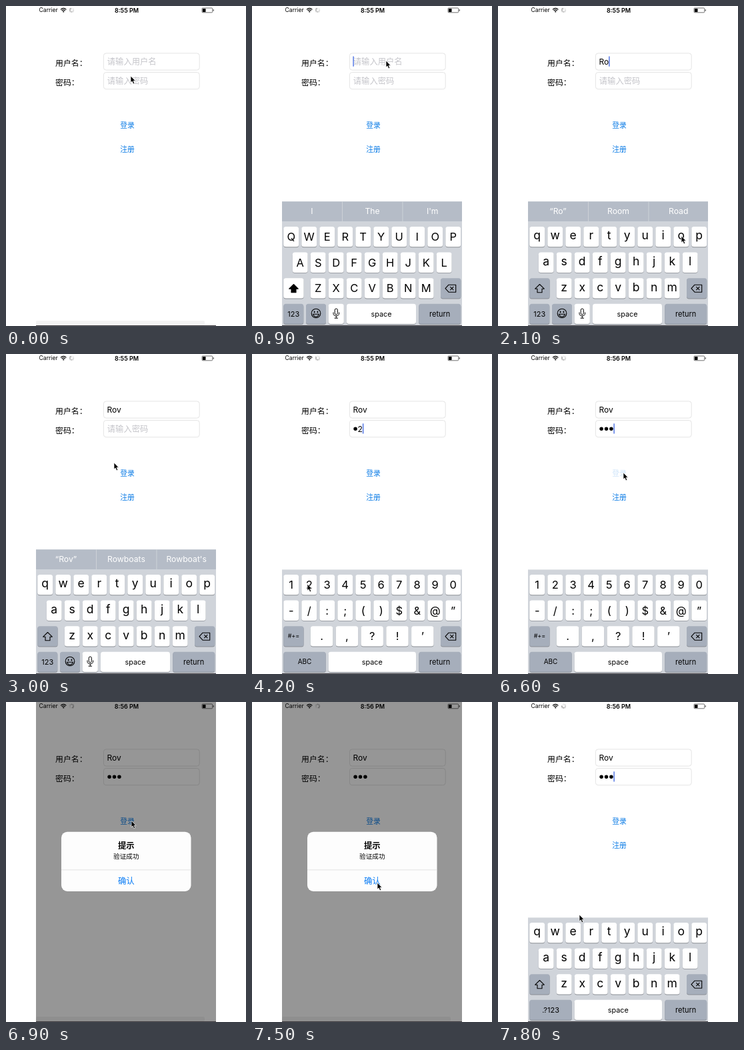
Animation, 360 px wide and 480 px high, one loop 8 s. Source, as an HTML page:

```html
<!DOCTYPE html>
<html lang="zh-CN">
<head>
<meta charset="utf-8">
<title>Login</title>
<style>
  html, body { margin: 0; width: 100%; height: 100%; overflow: hidden; background: #fff; }
  svg { display: block; width: 100vw; height: 100vh; }
  text { font-family: Inter, "Noto Sans CJK SC", "Noto Sans CJK", sans-serif; }
  .zh { font-family: "Noto Sans CJK SC", "Noto Sans CJK", sans-serif; }
</style>
</head>
<body>
<svg id="stage" viewBox="0 0 360 480" xmlns="http://www.w3.org/2000/svg"></svg>
<script>
const NS = 'http://www.w3.org/2000/svg';
const stage = document.getElementById('stage');
const BLUE = '#0a7be6', HINT = '#c5c5ca', DARK_KEY = '#a6aebb';

function add(parent, tag, attrs, content) {
  const el = document.createElementNS(NS, tag);
  for (const name in attrs) el.setAttribute(name, attrs[name]);
  if (content !== undefined) el.textContent = content;
  parent.appendChild(el);
  return el;
}
const group = parent => add(parent, 'g', {});
const rect = (parent, x, y, width, height, fill, rx = 0, more = {}) =>
  add(parent, 'rect', { x, y, width, height, fill, rx, ...more });
const path = (parent, d, more = {}) =>
  add(parent, 'path', { d, fill: 'none', stroke: '#000', 'stroke-width': 1.1, ...more });
const label = (parent, content, x, y, size, more = {}) =>
  add(parent, 'text', { x, y, 'font-size': size, 'text-anchor': 'middle', ...more }, content);
const chinese = (parent, content, x, y, size, more = {}) =>
  label(parent, content, x, y, size, { class: 'zh', 'text-anchor': 'start', ...more });
const show = (el, on) => el.setAttribute('visibility', on ? 'visible' : 'hidden');

// Status bar
rect(stage, 0, 0, 360, 480, '#fff');
rect(stage, 45, 472, 253, 7, '#f3f3f3', 2);
const statusBar = group(stage);
label(statusBar, 'Carrier', 49.5, 9.3, 8.64, { 'text-anchor': 'start' });
path(statusBar, 'M82 5.4Q86.2 1.4 90.4 5.4M83.6 7Q86.2 4.6 88.8 7', { 'stroke-width': 1.2 });
path(statusBar, 'M84.8 8.2Q86.2 7 87.6 8.2L86.2 9.8Z', { fill: '#000', stroke: 'none' });
const spinner = group(statusBar);
for (let i = 0; i < 12; i++) {
  path(spinner, 'M0 -1.9V-3.7', {
    transform: `rotate(${i * 30})`, stroke: '#555', 'stroke-width': .8, opacity: .1 + i / 13
  });
}
const clock = label(statusBar, '', 181, 9.5, 9, { 'font-weight': 600 });
rect(statusBar, 294, 3, 15.7, 6.8, 'none', 1.2, { stroke: '#333', 'stroke-width': .7 });
rect(statusBar, 294.9, 3.9, 4.6, 5, '#000', .4);
path(statusBar, 'M311.2 5.2V7.6', { stroke: '#333' });

// Form
chinese(stage, '用户名：', 74, 90, 11.9);
chinese(stage, '密码：', 74, 118.9, 11.9);
for (const y of [70.9, 99.5]) {
  rect(stage, 146.4, y, 143.8, 25.2, '#fff', 3.8, { stroke: '#dedede', 'stroke-width': .8 });
}
const userHint = chinese(stage, '请输入用户名', 151.8, 88, 12.3, { fill: HINT });
const passHint = chinese(stage, '请输入密码', 151.8, 116.9, 12.3, { fill: HINT });
const userText = label(stage, '', 151.4, 87.8, 12, { 'text-anchor': 'start' });
const dots = [0, 1, 2].map(i => add(stage, 'circle', { cx: 155.1 + 7.4 * i, cy: 112.3, r: 2.75 }));
const digit = label(stage, '', 0, 116.6, 12, { 'text-anchor': 'start' });
const caret = rect(stage, 0, 0, 1.4, 15.2, '#4a6fe3');
const login = chinese(stage, '登录', 182, 183.1, 10.8, { fill: BLUE, 'text-anchor': 'middle' });
chinese(stage, '注册', 182, 219.1, 10.8, { fill: BLUE, 'text-anchor': 'middle' });

// Keyboards
function key(parent, x, row, width, text, size, dark, lift = 0) {
  const y = 331 + 38.6 * row;
  rect(parent, x, y + .9, width, 30.3, '#8b8f95', 3.5);
  rect(parent, x, y, width, 30.3, dark ? DARK_KEY : '#fff', 3.5);
  if (text) label(parent, text, x + width / 2, y + 15 + size * .36 - lift, size);
}

function keyRow(parent, chars, row, firstCenter, pitch, width, size, lift) {
  [...chars].forEach((c, i) =>
    key(parent, firstCenter + pitch * i - width / 2, row, width, c, size, false, lift));
}

function backspace(parent) {
  key(parent, 283, 2, 30.3, '', 0, true);
  path(parent, 'M290 423.7L295 418.2H305.7V429.2H295Z', { 'stroke-linejoin': 'round' });
  path(parent, 'M297.3 421.2L302.3 426.2M302.3 421.2L297.3 426.2');
}

function shiftKey(parent, active) {
  key(parent, 47.3, 2, 30.3, '', 0, !active);
  path(parent, 'M62.5 417.5L69.3 424.2H66V429.7H59V424.2H55.7Z',
    { fill: active ? '#000' : 'none', 'stroke-linejoin': 'round' });
}

function emojiAndMic(parent) {
  key(parent, 81, 3, 30, '', 0, true);
  add(parent, 'circle', { cx: 96, cy: 461, r: 6.8, fill: 'none', stroke: '#000', 'stroke-width': 1.1 });
  for (const x of [93.6, 98.4]) add(parent, 'ellipse', { cx: x, cy: 459, rx: .9, ry: 1.4 });
  path(parent, 'M91.6 462.2H100.4Q99.4 466.2 96 466.2T91.6 462.2Z');
  key(parent, 114.6, 3, 23.2, '', 0, false);
  rect(parent, 124.2, 454, 4.2, 8.8, 'none', 2.1, { stroke: '#000' });
  path(parent, 'M122 459.5V461Q122 464.8 126.3 464.8T130.6 461V459.5M126.3 465V468M123.6 468.2H129',
    { 'stroke-width': 1 });
}

function keyboard({ rows, caps, digits, bar }) {
  const g = group(stage);
  rect(g, 45, 323.4, 270, 155.6, '#d0d4da');
  if (digits) {
    keyRow(g, rows[0], 0, 58.7, 27, 22.8, 16.5, 0);
    keyRow(g, rows[1], 1, 58.7, 27, 22.8, 16.5, 0);
    keyRow(g, rows[2], 2, 104.6, 37.8, 33.4, 16.5, 0);
    key(g, 47.3, 2, 30.3, '#+=', 9, true);
  } else {
    const size = caps ? 16.5 : 17.5, lift = caps ? 0 : 2;
    keyRow(g, rows[0], 0, 58.7, 27, 22.8, size, lift);
    keyRow(g, rows[1], 1, 72.2, 27, 22.8, size, lift);
    keyRow(g, rows[2], 2, 99.2, 27, 22.8, size, lift);
    shiftKey(g, caps);
  }
  backspace(g);
  if (bar) {
    key(g, 47.3, 3, 30, '123', 11, true);
    emojiAndMic(g);
    key(g, 142, 3, 104, 'space', 10.8);
  } else {
    key(g, 47.3, 3, 63.5, digits ? 'ABC' : '.?123', digits ? 10 : 11, true);
    key(g, 114.6, 3, 131.4, 'space', 10.8);
  }
  key(g, 250.2, 3, 63, 'return', 11, true);
  return g;
}

const letters = ['qwertyuiop', 'asdfghjkl', 'zxcvbnm'];
const boards = {
  caps: keyboard({ rows: letters.map(r => r.toUpperCase()), caps: true, bar: true }),
  lower: keyboard({ rows: letters, bar: true }),
  pass: keyboard({ rows: letters }),
  digits: keyboard({ rows: ['1234567890', '-/:;()$&@”', '.,?!’'], digits: true })
};
const hintBar = group(stage);
rect(hintBar, 45, 293.2, 270, 30.2, '#b5bcc7');
for (const x of [135, 225.5]) rect(hintBar, x, 293.2, .9, 30.2, '#d0d4da');
const hintTexts = [90, 180.5, 270.7].map(x => label(hintBar, '', x, 311.6, 12.2, { fill: '#fff' }));
const suggestions = {
  '': ['I', 'The', "I'm"],
  R: ['“R”', 'Really', 'Right'],
  Ro: ['“Ro”', 'Room', 'Road'],
  Rov: ['“Rov”', 'Rowboats', "Rowboat's"]
};

// Alert
const alertBox = group(stage);
rect(alertBox, 45, 0, 270, 479, '#000', 0, { opacity: .41 });
rect(alertBox, 83, 194.7, 194.5, 89.2, '#fdfdfd', 9);
rect(alertBox, 83, 251.5, 194.5, .8, '#dcdcdc');
const middle = { 'text-anchor': 'middle' };
chinese(alertBox, '提示', 180.3, 220.3, 12.3, { ...middle, 'font-weight': 700 });
chinese(alertBox, '验证成功', 180.3, 234.8, 9.6, middle);
chinese(alertBox, '确认', 180.3, 272.5, 12.4, { ...middle, fill: '#087bf5' });

rect(stage, 45, 479, 270, 1, '#3c393e');
const pointer = path(stage, 'M0 0V9.8L2.2 7.9L3.9 11.8L5.7 11L4.1 7.2H7Z',
  { fill: '#000', stroke: '#fff', 'stroke-width': .7 });

// Each step: [start ms, pointer x, y, keyboard, user, password, caret on]
const steps = [
  [0, 187, 105, '', '', '', 0],
  [300, 201, 82, '', '', '', 0],
  [900, 201, 82, 'caps', '', '', 1],
  [1200, 166, 250, 'caps', '', '', 1],
  [1500, 141, 344, 'lower', 'R', '', 1],
  [1800, 215, 345, 'lower', 'R', '', 1],
  [2100, 275, 345, 'lower', 'Ro', '', 1],
  [2400, 220, 395, 'lower', 'Ro', '', 1],
  [2700, 181, 422, 'lower', 'Rov', '', 1],
  [3000, 162, 163, 'lower', 'Rov', '', 0],
  [3300, 178, 110, 'pass', 'Rov', '', 1],
  [3600, 80, 458, 'pass', 'Rov', '', 1],
  [3900, 58, 346, 'digits', 'Rov', '1', 1],
  [4200, 83, 345, 'digits', 'Rov', '*2', 1],
  [4500, 100, 345, 'digits', 'Rov', '**', 0],
  [4800, 111, 345, 'digits', 'Rov', '**3', 1],
  [5100, 111, 345, 'digits', 'Rov', '**3', 0],
  [5400, 122, 310, 'digits', 'Rov', '***', 1],
  [5700, 150, 248, 'digits', 'Rov', '***', 0],
  [6000, 178, 200, 'digits', 'Rov', '***', 1],
  [6300, 188, 178, 'digits', 'Rov', '***', 0],
  [6600, 188, 178, 'digits', 'Rov', '***', 1],
  [6900, 188, 178, 'alert', 'Rov', '***', 0],
  [7200, 188, 235, 'alert', 'Rov', '***', 0],
  [7500, 188, 271, 'alert', 'Rov', '***', 0],
  [7800, 122, 319, 'pass', 'Rov', '***', 1]
];
const LOOP = 8000;

function render([start, x, y, mode, user, pass, caretOn]) {
  pointer.setAttribute('transform', `translate(${x} ${y})`);
  for (const name in boards) show(boards[name], name === mode);
  const typingUser = mode === 'caps' || mode === 'lower';
  show(hintBar, typingUser);
  suggestions[user].forEach((word, i) => hintTexts[i].textContent = word);
  show(alertBox, mode === 'alert');

  userText.textContent = user;
  show(userHint, !user);
  show(passHint, !pass);
  dots.forEach((dot, i) => show(dot, pass[i] === '*'));
  const shown = pass.replace(/\*/g, '');
  const digitX = 151.2 + 7.4 * (pass.length - shown.length);
  digit.textContent = shown;
  digit.setAttribute('x', digitX);

  show(caret, caretOn);
  const caretX = typingUser
    ? 151.4 + (user ? userText.getComputedTextLength() : 0)
    : digitX + (shown ? digit.getComputedTextLength() : 0);
  caret.setAttribute('x', caretX);
  caret.setAttribute('y', typingUser ? 75.5 : 104.3);

  login.setAttribute('opacity', start === 6600 ? .2 : 1);
  clock.textContent = start < 5400 ? '8:55 PM' : '8:56 PM';
  const turn = start < 3900 ? 0 : start < 6900 ? -30 : start < 7800 ? 180 : -60;
  spinner.setAttribute('transform', `translate(98.5 6.2) rotate(${turn})`);
}

const begin = performance.now();
let current;
function tick() {
  const time = (performance.now() - begin) % LOOP;
  const step = steps.findLast(s => s[0] <= time);
  if (step !== current) render(current = step);
  requestAnimationFrame(tick);
}
tick();
</script>
</body>
</html>
```
